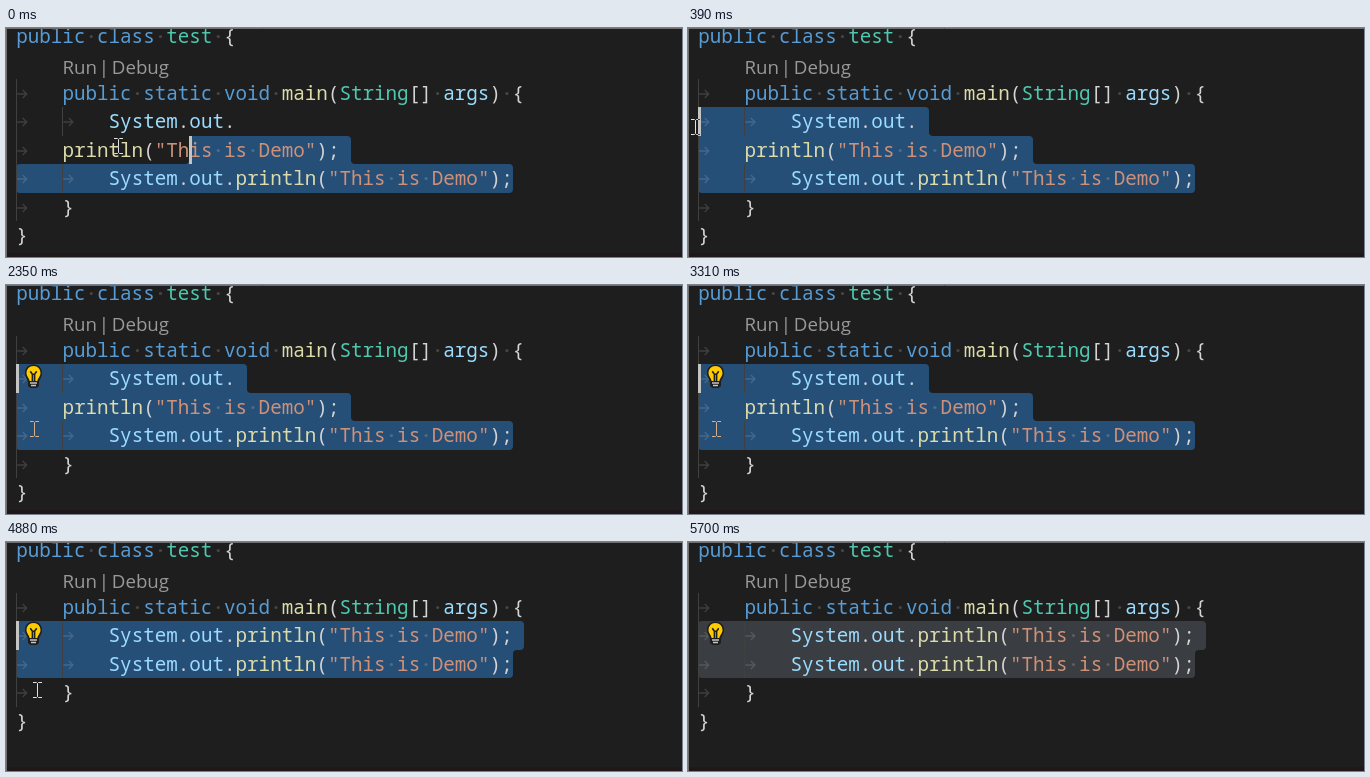
An HTML page for the animation above (5.8 s loop, 676 by 229 pixels).

```html
<!DOCTYPE html>
<html lang="en">
<head>
<meta charset="utf-8">
<title>Joining code lines</title>
<style>
html, body { margin: 0; width: 100%; height: 100%; overflow: hidden; background: #1e1e1e; }
svg { display: block; }
.code { font: 19.24px "Noto Sans Mono", monospace; white-space: pre; }
.lens { font: 18.7px "Open Sans", sans-serif; fill: #999; }
.tab { stroke: rgba(227, 228, 226, .17); fill: none; stroke-width: 1.4; }
.dot { fill: rgba(227, 228, 226, .2); }
.guide { fill: #404040; }
#mouse { fill: none; stroke: #fff; mix-blend-mode: difference; }
</style>
</head>
<body>
<svg width="676" height="229" viewBox="0 0 676 229">
  <rect width="676" height="229" fill="#1e1e1e"/>
  <rect y="225" width="676" height="4" fill="#1f171a"/>
  <path id="selection"/>
  <g id="split"></g>
  <g id="joined"></g>
  <g class="lens">
    <text x="56.5" y="46">Run</text>
    <text x="97.8" y="46" text-anchor="middle">|</text>
    <text x="105.8" y="46">Debug</text>
  </g>
  <path d="M0 .5H676M.5 0V229" stroke="#6f6f6f"/>
  <rect id="caret" width="3" fill="#c4c5c3"/>
  <g id="bulb">
    <path d="M27.5 79.5C22 79.5 19 83.5 19 88C19 92 21.5 94 22 97V101L24.5 103H30.5L33 101V97C33.5 94 36 92 36 88C36 83.5 33 79.5 27.5 79.5Z" fill="#1e1e1e"/>
    <path d="M27.5 81C23.2 81 20.5 84.3 20.5 88C20.5 91.5 23.3 93.2 23.6 96H31.4C31.7 93.2 34.5 91.5 34.5 88C34.5 84.3 31.8 81 27.5 81Z" fill="#fc0"/>
    <path d="M24.3 86.3L26.4 89.3V96M30.7 86.3L28.6 89.3V96M26.4 89.3H28.6" fill="none" stroke="#1e1e1e" stroke-width="1.6"/>
    <path d="M24 98H31M25 100.5H30" stroke="#c5c5c5" stroke-width="1.5"/>
  </g>
  <path id="mouse" d="M0 .5H3.5L4.5 1.5L5.5 .5H9M4.5 1.5V14.5M0 15.5H3.5L4.5 14.5L5.5 15.5H9"/>
</svg>
<script>
const LOOP = 5800, LEFT = 10.2, CHAR = 11.546;
const JOIN = 3930, BLUR = 5700, BULB = 810, LEAVE = 5450;
const COLORS = { k: '#569cd6', t: '#4ec9b0', f: '#dcdcaa', v: '#9cdcfe', s: '#ce9178', p: '#d4d4d4' };
const $ = id => document.getElementById(id);
const show = (id, on) => { $(id).style.display = on ? '' : 'none'; };
const rowTop = row => Math.floor(28.5 * row - 6);
const colX = col => LEFT + col * CHAR;

// Each token is a colour key followed by its text.
const OUT = ['vSystem', 'p.', 'vout', 'p.'];
const PRINT = ['fprintln', 'p(', 's"This is Demo"', 'p);'];
const head = { tabs: 0, tokens: ['kpublic class ', 'ttest ', 'p{'] };
const lens = { tabs: 0, tokens: [] };
const main = { tabs: 1, tokens: ['kpublic static void ', 'fmain', 'p(', 'tString', 'p[] ', 'vargs', 'p) {'] };
const call = { tabs: 2, tokens: [...OUT, ...PRINT] };
const ends = [{ tabs: 1, tokens: ['p}'] }, { tabs: 0, tokens: ['p}'] }];
const SPLIT = [head, lens, main, { tabs: 2, tokens: OUT }, { tabs: 1, tokens: PRINT }, call, ...ends];
const JOINED = [head, lens, main, call, call, ...ends];

const plain = line => line.tokens.map(s => s.slice(1)).join('');

function lineMarkup({ tabs, tokens }, row) {
  const y = rowTop(row), mid = y + 15, indent = tabs * 4;
  let out = '';
  for (let i = 0; i < tabs; i++) {
    const x = colX(i * 4);
    out += `<rect class="guide" x="${Math.floor(x)}" y="${y}" width="1" height="${rowTop(row + 1) - y}"/>`;
    out += `<path class="tab" d="M${x + 1} ${mid}h9.5m-4 -4l4 4l-4 4"/>`;
  }
  const spans = tokens.map(s => `<tspan fill="${COLORS[s[0]]}">${s.slice(1)}</tspan>`).join('');
  out += `<text class="code" xml:space="preserve" x="${colX(indent)}" y="${y + 21}">${spans}</text>`;
  [...plain({ tokens })].forEach((ch, i) => {
    if (ch === ' ') out += `<circle class="dot" cx="${colX(indent + i + .5)}" cy="${mid - .5}" r="1.6"/>`;
  });
  return out;
}

$('split').innerHTML = SPLIT.map(lineMarkup).join('');
$('joined').innerHTML = JOINED.map(lineMarkup).join('');

// Rounded outline of the text from (row, col) to the end of the last call.
function outline(lines, row, col) {
  const last = lines.lastIndexOf(call), right = [], left = [];
  for (let r = row; r <= last; r++) {
    const a = Math.floor(colX(r === row ? col : 0));
    const length = lines[r].tabs * 4 + plain(lines[r]).length;
    const b = Math.round(colX(length + (r < last ? 1 : 0)));
    right.push([b, rowTop(r)], [b, rowTop(r + 1)]);
    left.unshift([a, rowTop(r + 1)], [a, rowTop(r)]);
  }
  const around = (list, i, step) => list[(i + step + list.length) % list.length];
  const corners = [...right, ...left].filter((p, i, all) =>
    around(all, i, -1)[0] !== p[0] || around(all, i, 1)[0] !== p[0]);
  const toward = (p, q) => {
    const d = Math.hypot(q[0] - p[0], q[1] - p[1]), k = Math.min(4, d / 2) / d;
    return [p[0] + (q[0] - p[0]) * k, p[1] + (q[1] - p[1]) * k];
  };
  return corners.map((p, i) => {
    const from = toward(p, around(corners, i, -1)), to = toward(p, around(corners, i, 1));
    return `${i ? 'L' : 'M'}${from}Q${p} ${to}`;
  }).join('') + 'Z';
}

// Dragging upwards: within the word, to the line's start, to the line above.
function caretAt(t) {
  if (t < 150) return { row: 4, col: 15 };
  if (t < 270) return { row: 4, col: 4 };
  return { row: 3, col: 0 };
}

const BLINKS = [930, 1390, 1870, 2350, 2940, 3310, 4360, 4880, 5450];
const caretOn = t => BLINKS.filter(b => b <= t).length % 2 === 0;

// The pointer hops along each leg in equal time steps.
const easeOut = p => p * (2 - p), easeIn = p => p * p;
const LEGS = [
  { from: 0, to: 390, steps: 3, end: [3, 91] },
  { from: 390, to: 930, steps: 4, end: [-8, 96] },
  { from: 930, to: 1240, steps: 1, end: [-8, 100] },
  { from: 1390, to: 1930, steps: 4, end: [21, 133] },
  { from: 1930, to: 2350, steps: 1, end: [24, 136] },
  { from: JOIN, to: 4360, steps: 1, end: [27, 140] },
  { from: 4880, to: 5300, steps: 3, end: [637, 206], ease: easeIn }
];

function pointerAt(t) {
  let pos = [108, 110];
  for (const { from, to, steps, end, ease = easeOut } of LEGS) {
    if (t < from) break;
    const p = Math.min(1, Math.floor((t - from) / (to - from) * steps + 1e-6) / steps);
    pos = pos.map((v, i) => Math.round(v + (end[i] - v) * ease(p)));
  }
  return pos;
}

function draw(t) {
  const joined = t >= JOIN, { row, col } = caretAt(t);
  show('split', !joined);
  show('joined', joined);
  show('bulb', t >= BULB);
  show('caret', caretOn(t));
  show('mouse', t < LEAVE);
  $('selection').setAttribute('d', outline(joined ? JOINED : SPLIT, row, col));
  $('selection').setAttribute('fill', t < BLUR ? '#264f78' : '#3a3d41');
  $('caret').setAttribute('x', Math.floor(colX(col)));
  $('caret').setAttribute('y', rowTop(row));
  $('caret').setAttribute('height', rowTop(row + 1) - rowTop(row));
  $('mouse').setAttribute('transform', `translate(${pointerAt(t)})`);
}

const began = performance.now();
function tick() {
  draw((performance.now() - began) % LOOP);
  requestAnimationFrame(tick);
}
tick();
</script>
</body>
</html>
```
